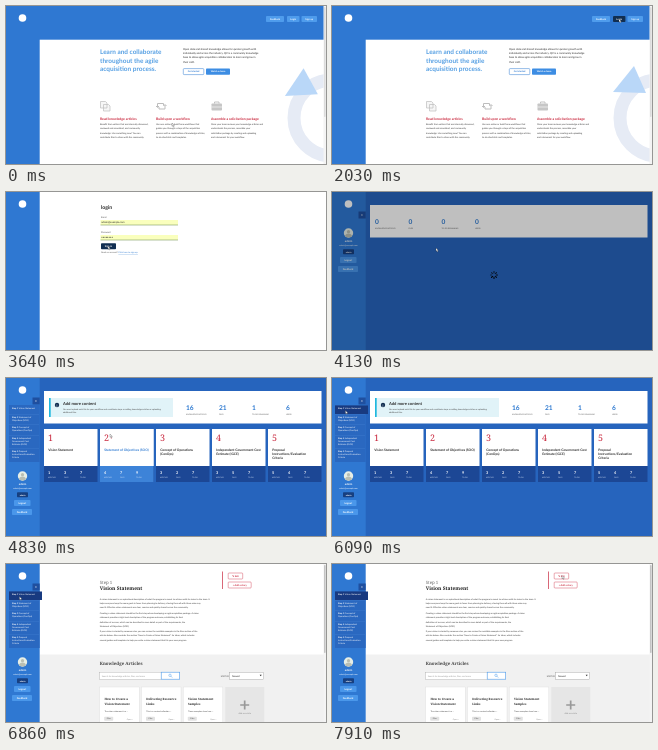
These frames come from a looping animation (320x158 px, 8000 ms). An HTML page:

```html
<!DOCTYPE html>
<html lang="en">
<head>
<meta charset="utf-8">
<title>Knowledge base walkthrough</title>
<style>
html, body { margin: 0; width: 100%; height: 100%; overflow: hidden; background: #fff; }
svg { display: block; width: 100vw; height: 100vh; }
text { font-family: Lato, "Open Sans", sans-serif; text-rendering: geometricPrecision; white-space: pre; }
.serif { font-family: "Noto Serif", "Liberation Serif", serif; }
.b { font-weight: 700; }
.m { text-anchor: middle; }
</style>
</head>
<body>
<svg id="stage" viewBox="0 0 320 158" preserveAspectRatio="none"></svg>
<script>
const LOOP = 8000, STEP = 70, EDGE = 33.7;
const SIDE = '#2f78d2', MAIN = '#2664bd', NAVY = '#112e51', DEEP = '#1c4795',
      LINK = '#2e7ad1', SKY = '#4f9cec', RED = '#c9283e', INK = '#2b2b2b';
const EMAIL = 'admin@example.com';

const rect = (x, y, w, h, fill, more = '') =>
  `<rect x="${x}" y="${y}" width="${w}" height="${h}" fill="${fill}" ${more}/>`;
const text = (x, y, size, str, fill = INK, cls = '') =>
  `<text x="${x}" y="${y}" font-size="${size}" fill="${fill}" class="${cls}">${str}</text>`;
const lines = (x, y, size, gap, list, fill, cls) =>
  list.map((s, i) => text(x, y + i * gap, size, s, fill, cls)).join('');
const path = (d, stroke, w = .6, fill = 'none') =>
  `<path d="${d}" stroke="${stroke}" stroke-width="${w}" fill="${fill}"/>`;
const disc = (x, y, r, fill) => `<circle cx="${x}" cy="${y}" r="${r}" fill="${fill}"/>`;
const group = (id, body, more = '') => `<g id="${id}" ${more}>${body}</g>`;
const shift = (x, y, body) => `<g transform="translate(${x} ${y})">${body}</g>`;
const button = (x, y, w, h, label, bg, fg = '#fff', size = 2.4, more = '') =>
  rect(x, y, w, h, bg, `rx=".8" ${more}`) + text(x + w / 2, y + h / 2 + size * .35, size, label, fg, 'b m');
const page = fill => rect(EDGE, 0, 320 - EDGE, 158, fill);
const scrollbar = (y, h, fill) => rect(317.5, 0, 2.5, 158, '#f4f4f4') + rect(318, y, 1.6, h, fill, 'rx=".8"');

const logo = disc(16.5, 12, 3.8, '#fff');

function home() {
  const features = [
    [94, 'Read knowledge articles', ['Benefit from vetters that are internally discussed,',
      'reviewed and annotated, and community', 'knowledge. Use something new? You can', 'contribute files to share with the community.']],
    [150, 'Build upon a workflow', ['Use one online or build from workflows that',
      'guides you through a steps of the acquisition', 'process with a combination of knowledge articles,', 'to-do checklists and templates.']],
    [205, 'Assemble a solicitation package', ['Once your team reviews your knowledge articles and',
      'understands the process, assemble your', 'solicitation package by creating and uploading', 'each document for your workflow.']]];
  const icons = path('M94.500 95.500h5l1.500 1.500v5h-6.500zM97.500 98.500h5l1.500 1.500v5h-6.500z', '#bdbdbd', .7, '#f6f6f6') +
    path('M151.500 101v-3.500h6v2M159 99v4h-6v-2M150 100l1.500 1.500 1.500-1.500M157.500 100l1.500-1.500 1.500 1.500', '#bdbdbd', 1) +
    rect(205.5, 97.5, 10.5, 7, '#c6c6c6', 'rx=".8"') + path('M208.500 97.500v-1.500h4.500v1.500', '#bdbdbd', .9) +
    path('M205.500 101h10.500', '#fff', .6);
  const wheel = '<circle cx="326" cy="112" r="38" fill="none" stroke="#e6ebf5" stroke-width="13"/>' +
    group('arrow', '<path d="M281 86L302 60L314 87Z" fill="#b9d7f8"/>');
  return rect(0, 0, 320, 158, SIDE) + rect(EDGE, 33.7, 320 - EDGE, 124.3, '#fff') + logo +
    wheel + scrollbar(1, 110, '#dcdcdc') +
    button(260, 10, 18, 6, 'Feedback', SKY) +
    button(281, 10, 12.5, 6, 'Login', SKY) +
    button(295.5, 10, 15.5, 6, 'Sign up', SKY) +
    group('loginHover', button(281, 10, 12.5, 6, 'Login', NAVY)) +
    lines(94, 48, 6.45, 8.6, ['Learn and collaborate', 'throughout the agile', 'acquisition process.'], '#559fe3', 'b') +
    lines(177, 44, 2.6, 4.2, ['Open data and shared knowledge allows for quicker growth with',
      'individually and across the industry. QV is a community knowledge',
      'base to allow agile acquisition collaborators to learn and grow in',
      'their craft.'], '#222') +
    button(177.3, 62.6, 20.5, 6, 'Get started', '#fff', LINK, 2.3, `stroke="${LINK}" stroke-width=".5"`) +
    button(200, 62.4, 24, 6.4, 'Watch a demo', '#3d8de3', '#fff', 2.3) + icons +
    features.map(([x, head, body]) => text(x, 113.8, 3.4, head, RED, 'b') +
      lines(x, 118.8, 2.25, 4.4, body, '#333')).join('');
}

function login() {
  const field = (y, label, value) => text(95, y, 2.3, label, '#555') +
    rect(94.5, y + 2, 77.5, 5, '#faffbd') + rect(94.5, y + 6.7, 77.5, .6, '#7d9b62') +
    text(95.3, y + 5.4, 2.5, value, '#222');
  return rect(0, 0, 320, 158, '#fff') + rect(0, 0, EDGE, 158, SIDE) + logo +
    text(95, 16.5, 5.2, 'login', INK, 'b') + field(26, 'Email', EMAIL) + field(41, 'Password', '••••••••') +
    button(95, 51.2, 15, 6, 'Sign in', NAVY, '#fff', 2.5) +
    text(95, 61.3, 2.15, `Need an account? <tspan fill="${LINK}" text-decoration="underline">Click here to sign up.</tspan>`, '#555');
}

function stats(xs, vals) {
  const names = ['KNOWLEDGE ARTICLES', 'FILES', 'TO-DO REMAINING', 'USERS'];
  return xs.map((x, i) => text(x, 31.7, 6.6, vals[i], LINK, 'b') + text(x, 36.5, 1.85, names[i], '#555')).join('');
}

function dashboard() {
  const titles = [['Vision Statement'], ['Statement of Objectives (SOO)'], ['Concept of Operations', '(ConOps)'],
    ['Independent Government Cost', 'Estimate (IGCE)'], ['Proposal', 'Instructions/Evaluation', 'Criteria']];
  const counts = [[1, 3, 7], [4, 7, 9], [3, 2, 7], [3, 5, 7], [5, 4, 7]];
  const card = (x, i, hot) => rect(x, 51, 53.5, 37, '#fff') + rect(x, 88, 53.5, 16, hot ? '#3d83d8' : DEEP) +
    text(x + 4, 62.5, 9, i + 1, RED, 'serif') + (hot ? text(x + 10.5, 60.5, 4, '»', RED) : '') +
    lines(x + 4.2, 73.2, 3.25, 4, titles[i], hot ? LINK : INK, 'b') +
    counts[i].map((n, k) => text(x + 4 + k * 16, 95.5, 3.8, n, '#fff', 'b') +
      text(x + 4 + k * 16, 99.8, 1.75, ['ARTICLES', 'FILES', 'TO-DO'][k], '#dbe7fa')).join('');
  const alert = rect(43, 20, 124, 19, '#e1f3f8') + rect(43, 20, 1.7, 19, '#20b8de') +
    disc(51, 27, 2.2, NAVY) + text(51, 28.5, 3.5, 'i', '#fff', 'b m') +
    text(57, 27.3, 4.1, 'Add more content', INK, 'b') +
    lines(57, 31.5, 2.1, 3.3, ['You must upload each file for your workflow and contribute steps as adding knowledge articles or uploading',
      'additional files.'], '#444');
  return rect(0, 0, 320, 158, MAIN) + rect(38, 13, 277.5, 32.5, '#fff') +
    group('empty', stats([43, 76.5, 109.5, 143], [0, 0, 0, 0])) +
    group('filled', alert + stats([180, 213, 246, 280], [16, 21, 1, 6]) +
      titles.map((_, i) => card(38 + i * 56, i)).join('') + group('cardHover', card(94, 1, true)));
}

const actions = x => rect(x, 7.5, .7, 17.5, RED) +
  button(x + 6, 9, 14.5, 6, '✎ Edit', '#fff', RED, 2.3, `stroke="${RED}" stroke-width=".4"`) +
  button(x + 6, 18, 23, 6, '+ Add a story', '#fff', RED, 2.4, `stroke="${RED}" stroke-width=".4"`);

const search = () => text(0, 0, 4.4, 'Knowledge Articles', '#444', 'serif b') +
  rect(0, 7.2, 62, 7, '#fff', 'stroke="#aaa" stroke-width=".4"') +
  text(2, 11.6, 2.2, 'Search for knowledge articles, files, and more', '#999') +
  rect(61.5, 7.2, 18.5, 7, '#fff', `stroke="${SKY}" stroke-width=".6"`) +
  `<circle cx="70.300" cy="10.300" r="1.200" fill="none" stroke="${SKY}" stroke-width=".5"/>` +
  path('M71.200 11.200l1.300 1.300', SKY, .6) +
  text(121, 11.6, 2.1, 'SORT BY', '#444') +
  rect(130, 7.2, 34, 7, '#fff', 'stroke="#999" stroke-width=".4"') + text(132.2, 11.7, 2.4, 'Newest', '#222') +
  '<path d="M160 9.700h2l-1 1.500z" fill="#222"/>';

function article() {
  const body = [
    [36, ['A vision statement is an aspirational description of what the program is meant to achieve with its vision to the team. It',
      'helps everyone keep the same goals in focus from planning to delivery, sharing them all with those who may',
      'need it. Effective vision statements are clear, concise and quickly shared across the community.']],
    [50.3, ['Creating a vision statement should be the first step when developing an agile acquisition package. A vision',
      'statement provides a high-level description of the program outcome, establishing its final',
      'definition of success, which can be described in more detail as part of the requirements, the',
      'Statement of Objectives (SOO).']],
    [68.3, ['If your vision is started by someone else, you can review the available examples in the files section of the',
      'articles below. Also consider the section “How to Create a Vision Statement” for ideas, which includes',
      'several guides and templates to help you write a vision statement that fits your own program.']]];
  const cards = [['How to Create a', 'Vision Statement'], ['Delivering Resource', 'Links'], ['Vision Statement', 'Samples']];
  const content = text(93, 19.8, 4.4, 'Step 1', '#666', 'serif') +
    text(93, 26.3, 4.95, 'Vision Statement', '#222', 'serif b') +
    body.map(([y, list]) => lines(93, y, 2.15, 4.1, list, '#333')).join('') +
    actions(215.5) + shift(93, 101, search()) +
    cards.map((c, i) => {
      const x = 93 + i * 41.8;
      return rect(x, 123, 39.5, 38, '#fff', 'stroke="#ddd" stroke-width=".4"') +
        lines(x + 4.7, 136, 2.95, 4.8, c, '#222', 'serif b') +
        text(x + 4.7, 147.8, 2, ['The vision statement is a ...', 'This is a curated collection ...', 'These examples show how ...'][i], '#444') +
        button(x + 4.5, 152.8, 9, 4, 'Files', '#e2e2e2', '#666', 1.9) + text(x + 27, 155.5, 1.9, 'Open »', '#888');
    }).join('') + rect(218.5, 123, 39, 38, '#e6e6e6') +
    path('M238 136.500v9M233.500 141h9', '#999', 1.7) + text(238, 150, 2.1, 'Add an article', '#888', 'm');
  return page('#fff') + rect(EDGE, 90.5, 320 - EDGE, 67.5, '#f1f1f1') + shift(.7, 0, content) + scrollbar(1, 88, '#c4c4c4');
}

const loading = () => page('#fff') + actions(105) + rect(EDGE, 41, 320 - EDGE, 43, '#ededed') + shift(94.3, 53, search());

function sidebar() {
  const items = [[30.7, ['Vision Statement']], [39.7, ['Statement of', 'Objectives (SOO)']], [50, ['Concept of', 'Operations (ConOps)']],
    [61, ['Independent', 'Government Cost', 'Estimate (IGCE)']], [74, ['Proposal', 'Instructions/Evaluation', 'Criteria']]];
  const nav = rect(3, 27, EDGE - 3, 57, '#2a68c0') + group('navActive', rect(3, 27.5, 33, 8.5, '#183a80')) +
    items.map(([y, l], i) => lines(6, y, 2.2, 2.9,
      [`<tspan font-weight="700">Step ${i + 1}</tspan> ` + l[0], ...l.slice(1)], '#fff') +
      (i ? rect(3, y - 3.6, 30, .3, '#4483d4') : '')).join('');
  const user = disc(16.5, 41, 4.7, '#e6eee6') + disc(16.5, 39.7, 1.6, '#b9beb2') +
    '<path d="M13 44.200q.6-2.600 3.500-2.600t3.500 2.600q-3.500 2.600-7 0z" fill="#b9beb2"/>' +
    text(16.5, 50.3, 2.7, 'admin', '#fff', 'b m') + text(16.5, 54.3, 2, EMAIL, '#fff', 'm') +
    button(11, 57.3, 11, 5, 'admin', '#173f80', '#fff', 2.1) +
    button(8, 65, 16.5, 6, 'Logout', '#4a97ea', '#fff', 2.5) +
    button(6, 74, 20, 6, 'Feedback', '#4a97ea', '#fff', 2.5);
  return rect(0, 0, EDGE, 158, SIDE) + logo + rect(26.5, 19.5, 7.2, 7, '#1f4f9f') +
    text(29.8, 24.4, 3.8, '«', '#fff', 'b m') + group('nav', nav) + group('user', user);
}

const stage = document.getElementById('stage');
stage.innerHTML = group('home', home()) + group('login', login()) + group('dash', dashboard()) +
  group('loading', loading()) + group('article', article()) + group('side', sidebar()) +
  group('veil', rect(0, 0, 320, 158, '#000')) +
  group('spin', Array.from({ length: 8 }, (_, i) =>
    `<path d="M0-3.500v1.400" stroke="#000" stroke-width="1.100" stroke-linecap="round" opacity="${1 - i * .07}" transform="rotate(${-i * 45})"/>`).join('')) +
  group('cursor', path('M0 0v3.300l.8-.7.600 1.300.6-.3-.6-1.200h1z', '#333', .3, '#fff'));

const el = id => document.getElementById(id);
const show = (id, on) => el(id).setAttribute('opacity', +on);

// rows of [time, value, ...], eased between rows
function track(t, rows) {
  let i = rows.length - 1;
  while (i > 0 && rows[i][0] > t) i--;
  const a = rows[i], b = rows[i + 1] || a;
  const k = b === a ? 0 : (t - a[0]) / (b[0] - a[0]), e = k * k * (3 - 2 * k);
  return a.slice(1).map((v, j) => v + (b[j + 1] - v) * e);
}

const POINTER = [[0, 166, 117], [560, 178, 108], [1050, 284, 12], [1260, 284, 12], [1470, 287, 13], [2380, 287, 13],
  [3150, 102, 54], [3640, 102, 54], [3780, 104, 56], [5180, 104, 56], [6020, 13.5, 32.5],
  [7070, 13.5, 32.5], [7910, 230, 11.5]];
const VEIL = [[0, 0], [3640, 0], [3780, .25], [4130, .25], [4340, 0], [6300, 0], [6510, .3], [6650, .3], [6720, 0]];
const FILL = [[0, 0], [4410, 0], [4620, 1]];

function draw(now) {
  const t = Math.floor((now % LOOP) / STEP) * STEP;
  const within = (a, b) => t >= a && t < b;
  show('home', t < 2100);
  show('login', within(2100, 3710));
  show('dash', within(3710, 6440));
  show('loading', within(6440, 6720));
  show('article', t >= 6720);
  show('side', t >= 3710);
  show('loginHover', within(1400, 2100));
  el('arrow').setAttribute('transform', `rotate(${t < 2030 ? -5 : 0} 326 112)`);

  const [fill] = track(t, FILL);
  show('filled', fill);
  show('empty', 1 - fill);
  show('nav', fill);
  el('user').setAttribute('transform', `translate(0 ${57 * fill})`);
  show('cardHover', t < 5460);
  show('navActive', t >= 5880);

  const [veil] = track(t, VEIL);
  show('veil', veil);
  show('spin', veil > .02);
  el('spin').setAttribute('transform', `translate(162 83) rotate(${Math.floor(t / 140) * 45})`);
  const [x, y] = track(t, POINTER);
  el('cursor').setAttribute('transform', `translate(${x} ${y})`);
}

const start = performance.now();
function tick() {
  draw(performance.now() - start);
  requestAnimationFrame(tick);
}
tick();
</script>
</body>
</html>
```
